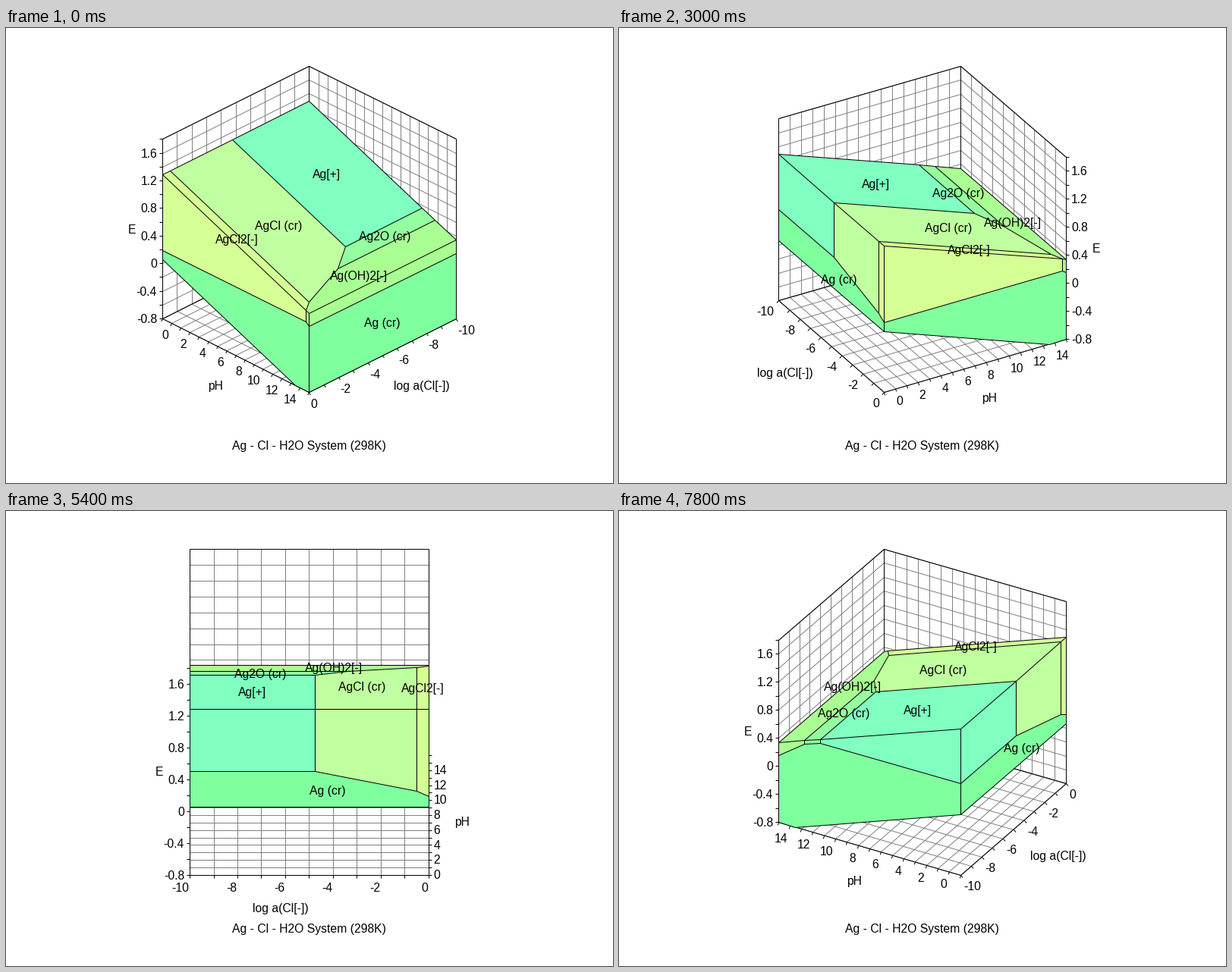
Write a matplotlib script that moves like this. It is 800 px wide and 600 px high and loops after 8000 ms.

```python
import math

import numpy as np
import matplotlib.pyplot as plt
from matplotlib.animation import FuncAnimation
from matplotlib.collections import LineCollection, PolyCollection

plt.rcParams["font.family"] = "Liberation Sans"

FRAMES, INTERVAL, STEP = 40, 200, 5       # STEP: degrees per frame
W, H, DPI = 800, 600, 100
CX, TOP, BASE = 399.95, 50.2, 480.2
PX = 72 / DPI                             # one pixel in points
FONT = 15.7 * PX
K = 0.0592                                # volts per decade at 298 K
GRID = "#808080"

PH, LG, EV = (-1, 15), (-10, 0), (-0.8, 1.8)
CORNERS = [(15, 0), (-1, 0), (-1, -10), (15, -10)]
TITLES = ["pH", "log a(Cl[-])"]

# Corners of the stability fields on the (pH, log a) plane
A, B = (-1, -4.75), (11.33, -4.75)
C, D = (12.7, -3.38), (14.14, -0.5)
E, F = (14.64, 0), (-1, -0.5)
FIELDS = [
    ("Ag[+]", "#80ffc0", [(-1, -10), (11.33, -10), B, A]),
    ("AgCl (cr)", "#c0ff9f", [A, B, C, D, F]),
    ("AgCl2[-]", "#d5ff95", [F, D, E, (-1, 0)]),
    ("Ag2O (cr)", "#95ff9f", [(11.33, -10), (12.7, -10), C, B]),
    ("Ag(OH)2[-]", "#aaff92", [(12.7, -10), (15, -10), (15, 0), E, D, C]),
]
METAL = ("Ag (cr)", "#80ff9f")


def upper(ph):
    return 1.229 - K * ph


def lower(ph):
    return max(EV[0], -K * ph)


def metal(ph, lg):
    """Potential below which the metal is stable."""
    return min(0.503, 0.503 - K * (ph - 11.33), 0.422 - 2 * K * (ph - 12.7),
               0.503 - K * (lg + 4.75), 0.252 - 2 * K * (lg + 0.5))


def side_polys(axis, value):
    """Field polygons on one vertical face; the metal comes last."""
    polys, rim = [], set()
    for _, color, verts in FIELDS:
        ends = [v for v in verts if v[axis] == value]
        if len(ends) == 2:
            a, b = ends
            polys.append((color, [(*a, upper(a[0])), (*b, upper(b[0])),
                                  (*b, metal(*b)), (*a, metal(*a))]))
            rim.update(ends)
    rim = sorted(rim)
    foot = [rim[0], rim[-1]]
    if axis == 1:
        foot.insert(1, (-EV[0] / K, value))
    polys.append((METAL[1], [(*v, lower(v[0])) for v in foot]
                  + [(*v, metal(*v)) for v in reversed(rim)]))
    return polys


SIDES = {(i, c): side_polys(i, c) for i, lim in enumerate((PH, LG)) for c in lim}


class View:
    def __init__(self, deg):
        self.turn = math.ceil((deg - 45) / 90)
        self.phi = deg - 90 * self.turn
        self.t = math.radians(deg)
        depth = math.cos(math.radians(self.phi))
        self.r = (BASE - TOP) / (depth + math.sqrt(1.5))
        self.h = self.r * math.sqrt(1.5)
        self.front = self.r * depth

    def corner(self, n):
        return CORNERS[(self.turn + n) % 4]

    def __call__(self, ph, lg, e=EV[0]):
        u, w = (ph + 1) / 16 - 0.5, (lg + 10) / 10 - 0.5
        p, q = u - w, u + w
        c, s = math.cos(self.t), math.sin(self.t)
        x = CX + self.r * (p * c + q * s)
        d = self.r * (q * c - p * s)
        y = BASE - (self.front - d) / 2 - self.h * (e - EV[0]) / 2.6
        return math.floor(x) + 0.5, math.floor(y) + 0.5

    def faces(self):
        """Visible vertical faces, pH faces first."""
        for (axis, value), polys in SIDES.items():
            high = value == (PH, LG)[axis][1]
            angle = self.t + math.pi / 4 * (1 if axis == 0 else -1)
            if math.cos(angle + (0 if high else math.pi)) > 1e-6:
                yield polys


def units(axis):
    lo, hi = (PH, LG)[axis]
    return range(lo, hi + 1)


def along(point, axis, value):
    return (value, point[1]) if axis == 0 else (point[0], value)


fig = plt.figure(figsize=(W / DPI, H / DPI), dpi=DPI, facecolor="white")
ax = fig.add_axes([0, 0, 1, 1])
ax.set(xlim=(0, W), ylim=(H, 0))
ax.axis("off")
parts = []


def add(collection):
    # equal zorder keeps the order of drawing
    collection.set(zorder=1, linewidth=PX, snap=False)
    parts.append(ax.add_collection(collection))


def lines(segs, color="black"):
    add(LineCollection(segs, colors=color))


def text(x, y, s, ha="center"):
    parts.append(ax.text(x, y, s, ha=ha, va="baseline", fontsize=FONT))


def draw_box(view):
    near, left, back, right = (view.corner(n) for n in range(4))
    levels = np.linspace(*EV, 14)
    grid, edges = [], []
    for end in (left, right):
        axis = 0 if end[0] != back[0] else 1
        for v in units(axis):
            p = along(back, axis, v)
            grid.append([view(*p), view(*p, EV[1])])
            grid.append([view(*p), view(*along(near, axis, v))])
        grid += [[view(*back, e), view(*end, e)] for e in levels]
        edges += [[view(*back), view(*end)], [view(*near), view(*end)],
                  [view(*back, EV[1]), view(*end, EV[1])],
                  [view(*end), view(*end, EV[1])]]
    edges.append([view(*back), view(*back, EV[1])])
    lines(grid, GRID)
    lines(edges)


def draw_solid(view):
    polys, colors = [], []
    side_faces = list(view.faces())
    tops = [(c, [(*v, upper(v[0])) for v in verts]) for _, c, verts in FIELDS]
    for color, verts in sum(side_faces, []) + tops:
        polys.append([view(*v) for v in verts])
        colors.append(color)
    add(PolyCollection(polys, facecolors=colors))
    # one pass per distinct edge, so shared edges keep the same weight
    edges = {tuple(sorted(pair)) for p in polys for pair in zip(p, p[1:] + p[:1])}
    lines(sorted(edges))
    names = [METAL[0]] + [f[0] for f in FIELDS]
    shapes = [side_faces[0][-1][1]] + [verts for _, verts in tops]
    for name, verts in zip(names, shapes):
        x, y = view(*np.mean(verts, axis=0))
        text(x - 0.5, y + 5.5, name)


def draw_floor_axis(view, end, sign):
    near = view.corner(0)
    axis = 0 if end[0] != near[0] else 1
    (x0, y0), (x1, y1) = view(*near), view(*end)
    size = math.hypot(x1 - x0, y1 - y0)
    nx, ny = -sign * (y1 - y0) / size, sign * (x1 - x0) / size
    ha = "left" if sign > 0 else "right"
    ticks = []
    for v in units(axis):
        x, y = view(*along(near, axis, v))
        ticks.append([(x, y), (x + 4 * nx, y + 4 * ny)])
        if v % 2 == 0:
            text(x + 7 * nx - 1.2, y + 7 * ny + 14.3, str(v), ha)
    lines(ticks)
    text((x0 + x1) / 2 + 35 * nx - 1, (y0 + y1) / 2 + 35 * ny + 14,
         TITLES[axis], ha)


def draw_e_axis(view):
    sign = -1 if view.phi >= 0 else 1
    end = view.corner(1 if sign < 0 else 3)
    ha = "left" if sign > 0 else "right"
    ticks = []
    for i in range(14):
        e = EV[0] + 0.2 * i
        x, y = view(*end, e)
        ticks.append([(x, y), (x + 4 * sign, y)])
        if i % 2 == 0:
            text(x + 7 * sign - 0.4, y + 5.5, f"{round(e, 1) + 0:g}", ha)
    lines(ticks)
    x, y = view(*end, sum(EV) / 2)
    text(x + 35 * sign - 0.4, y + 5.5, "E", ha)


def update(i):
    while parts:
        parts.pop().remove()
    view = View(i * STEP)
    draw_box(view)
    draw_solid(view)
    draw_floor_axis(view, view.corner(1), -1)
    draw_floor_axis(view, view.corner(3), 1)
    draw_e_axis(view)
    text(399.5, 556, "Ag - Cl - H2O System (298K)")
    return parts


anim = FuncAnimation(fig, update, frames=FRAMES, interval=INTERVAL,
                     init_func=lambda: [], repeat=True, repeat_delay=0, blit=False)
plt.show()
```
